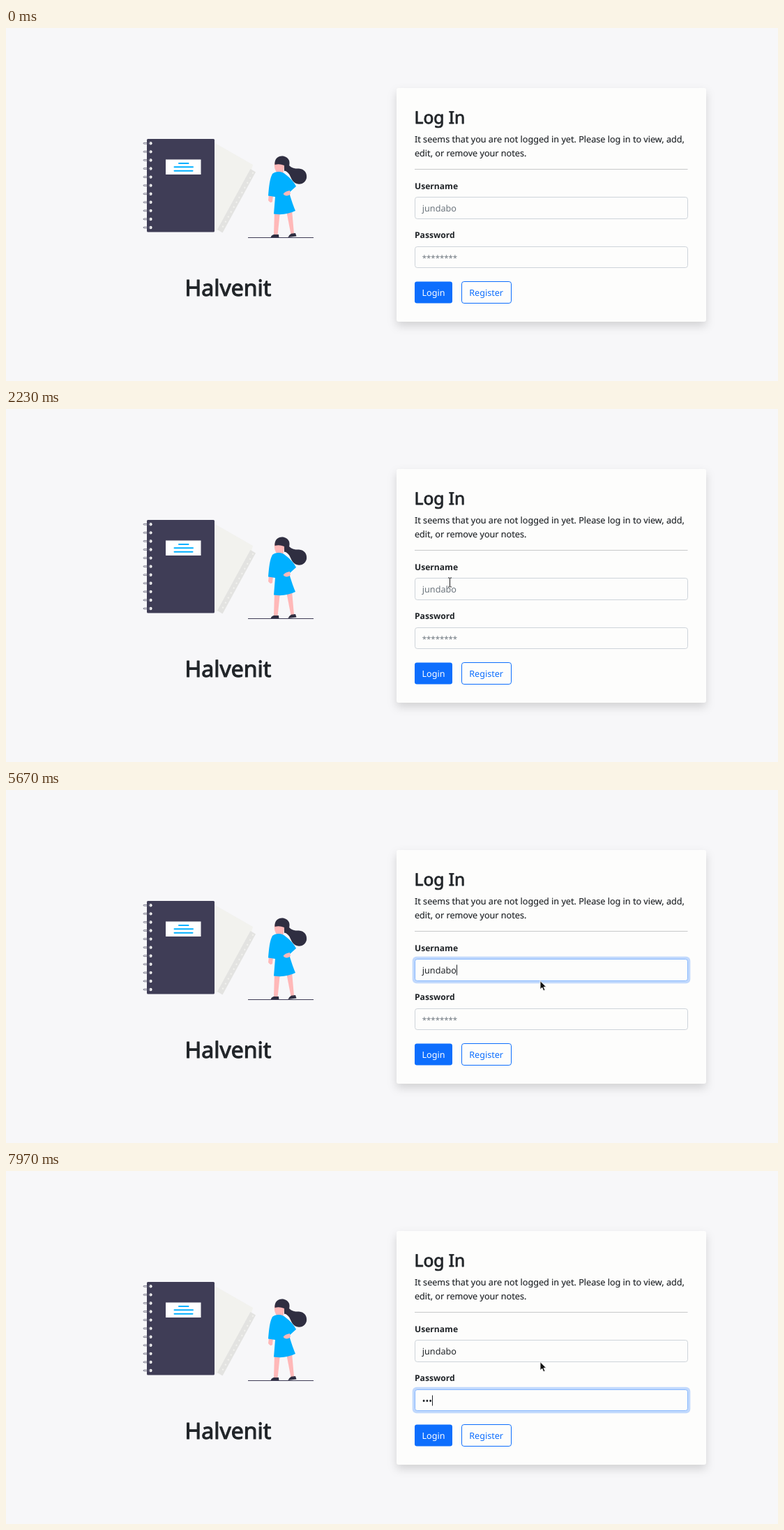
Recreate the animation shown at these times as an HTML page. Size 1107 by 506 pixels, loop 8 s.

```html
<!DOCTYPE html>
<html lang="en">
<head>
<meta charset="utf-8">
<title>Log In</title>
<style>
  html, body { margin: 0; width: 100%; height: 100%; overflow: hidden; background: #f7f7f9; }
  svg { display: block; width: 1107px; height: 506px; }
  text { font: 12.62px "Noto Sans", "Open Sans", sans-serif; fill: #212529; white-space: pre; text-rendering: geometricPrecision; }
  .title, .head { stroke: #212529; stroke-linejoin: round; }
  .title { font-size: 32px; stroke-width: 1.1px; text-anchor: middle; }
  .head { font-size: 24.6px; stroke-width: .85px; }
  .para { stroke: #212529; stroke-width: .15px; }
  .label { font-size: 12.1px; font-weight: 700; }
  .hint { fill: #6c757d; }
  .stars { font-size: 11.4px; }
  .card { fill: #fdfdfc; filter: drop-shadow(0 6.5px 6.5px rgba(0, 0, 0, .15)); }
  .halo { fill: #0d6efd; fill-opacity: .25; }
  .box { fill: #fdfdfc; stroke: #ced4da; }
  .caret { stroke: #212529; }
  .dark { fill: #2f2e41; }
  .skin { fill: #ffb8b8; }
  .blue { fill: #00b0ff; }
</style>
</head>
<body>
<svg viewBox="0 0 1107 506">
  <!-- loose page -->
  <path d="M298 164 L354 196 L352 204 L304 290 L298 290Z" fill="#f2f2ee"/>
  <path d="M350.5 202 L358 206.5 L310.5 293.5 L303 289Z" fill="#e3e3e1"/>
  <path d="M354.5 207 L308 290" stroke="#f2f2ee" stroke-width="2" stroke-dasharray="2 6" fill="none"/>

  <!-- notebook -->
  <rect x="202" y="159" width="97" height="133.5" rx="1.5" fill="#3f3d56"/>
  <g id="rings"></g>
  <rect x="229" y="188.5" width="50.5" height="21.5" fill="#fff"/>
  <path d="M248 194H261.5M241.5 199.2H268M241.5 204.7H267.5" stroke="#00b0ff" stroke-width="2" stroke-linecap="round"/>

  <!-- woman -->
  <path class="skin" d="M385 263 L393 263 L389.5 297 L384 297Z"/>
  <path class="skin" d="M402 262 L410 261 L413 295 L408.5 295.5Z"/>
  <path class="dark" d="M379.5 300.5 Q380 297 384 296 L391 296 L391.5 300.5Z"/>
  <path class="dark" d="M404.5 300 Q406 296.5 409 294.8 L415 294 L416.5 298.5Z"/>
  <path class="dark" d="M402 190 C406 200 412 202 420 201.5 C428 202 432 208 431 215 C429 224 419 226 413 221 C407 216 409 208 399 204Z"/>
  <path class="skin" d="M385 193 L400 193 L397.5 208 L388 207 Q384 201 385 193Z"/>
  <path class="dark" d="M385.5 196 C384 181 402 180 406 190 C408 197 404 204 399 205 L399 197 Q392 194 385.5 196Z"/>
  <path class="skin" d="M377 239 L383 240 L382 249 Q379 252 376 247Z"/>
  <path class="blue" d="M382 209 C387 205 396 205 401 210 C408 215 413 221 416 227 L406 236 C409 246 412 255 415 262 Q401 269 384 266.5 L386 242 L376 240.5 C377 229 378 216 382 209Z"/>
  <path class="skin" d="M407 233 L408 238 Q402 243 397.5 238 Q400 234 407 233Z"/>
  <path d="M347 300.5H441" stroke="#3f3d56"/>
  <text class="title" x="318.5" y="384">Halvenit</text>

  <!-- form -->
  <rect class="card" x="560" y="86" width="444" height="335" rx="3.3"/>
  <text class="head" x="585.5" y="137">Log In</text>
  <text class="para" x="586" y="164">It seems that you are not logged in yet. Please log in to view, add,</text>
  <text class="para" x="586" y="184">edit, or remove your notes.</text>
  <path d="M586 202.5H977.5" stroke="#c8c9ca"/>
  <text class="label" x="586" y="231">Username</text>
  <text class="label" x="586" y="301">Password</text>
  <g id="fields"></g>
  <rect x="586" y="363.5" width="54" height="31" rx="3.3" fill="#0d6efd"/>
  <text x="596.5" y="383.7" style="fill:#fff">Login</text>
  <rect x="653.5" y="363.5" width="71" height="31" rx="3.3" fill="none" stroke="#0d6efd"/>
  <text x="664.2" y="383.7" style="fill:#0d6efd">Register</text>

  <!-- pointers -->
  <path id="arrow" d="M0 0V12.2L2.8 9.6L4.8 14.2L7 13.2L5 8.8H8.8Z" fill="#111" stroke="#fff" stroke-width=".9"/>
  <path id="beam" d="M-2.5 -6.5H-.7L0 -5.8L.7 -6.5H2.5M0 -5.8V5.8M-2.5 6.5H-.7L0 5.8L.7 6.5H2.5" fill="none" stroke="#222"/>
</svg>
<script>
const LOOP = 8000, BLINK = 500, FADE = 150;
const byId = id => document.getElementById(id);

function add(parent, tag, attrs, text = '') {
  const el = document.createElementNS('http://www.w3.org/2000/svg', tag);
  for (const k in attrs) el.setAttribute(k, attrs[k]);
  el.textContent = text;
  return parent.appendChild(el);
}

for (let i = 0; i < 11; i++) {
  const y = 165.3 + i * 12.07;
  add(byId('rings'), 'circle', { cx: 207.4, cy: y, r: 2.2, fill: '#f2f2f2' });
  add(byId('rings'), 'path', {
    d: `M207 ${y - .9}H198Q195.5 ${y} 198 ${y + .9}H207`,
    fill: 'none', stroke: '#55536a', 'stroke-width': .7
  });
}

// keys: times at which each character is typed
const fields = [
  { y: 242.5, h: 31, hint: 'jundabo', value: 'jundabo', focus: 2550, blur: 6030,
    keys: [3700, 4180, 4330, 4490, 4680, 4880, 5200] },
  { y: 313.5, h: 30, hint: '********', value: '•••', focus: 6030, blur: Infinity,
    keys: [7300, 7600, 7830], cls: ' stars' }
];

for (const f of fields) {
  const g = byId('fields'), base = f.y + 20;
  f.halo = add(g, 'rect', { class: 'halo', x: 582.7, y: f.y - 3.8, width: 398.6, height: f.h + 7.6, rx: 6 });
  f.box = add(g, 'rect', { class: 'box', x: 586.5, y: f.y, width: 391, height: f.h, rx: 3.3 });
  f.hintEl = add(g, 'text', { class: 'hint' + (f.cls || ''), x: 596.8, y: base }, f.hint);
  f.text = add(g, 'text', { x: 596.8, y: base });
  f.caret = add(g, 'path', { class: 'caret' });
}

// pointer stops: time, x, y
const stops = [
  [1480, 10, 330], [1800, 330, 296], [2130, 634, 250], [2230, 636.5, 248.5],
  [2450, 650, 256], [2640, 652, 257], [2810, 766, 273.6]
];

const clamp = v => Math.min(1, Math.max(0, v));
const smooth = v => v * v * (3 - 2 * v);
const show = (el, on) => el.setAttribute('visibility', on ? 'visible' : 'hidden');
const mix = (a, b, k) => a.map((v, i) => Math.round(v + (b[i] - v) * k));

function drawField(f, t) {
  const k = smooth(clamp((t - f.focus) / FADE)) - smooth(clamp((t - f.blur) / FADE));
  f.halo.setAttribute('opacity', k);
  f.box.style.stroke = `rgb(${mix([206, 212, 218], [134, 183, 254], k)})`;

  const done = f.keys.filter(key => key <= t);
  f.text.textContent = f.value.slice(0, done.length);
  show(f.hintEl, !done.length);

  const since = t - (done.length ? done[done.length - 1] : f.focus);
  const x = Math.floor(597 + (done.length ? f.text.getComputedTextLength() : 0)) + .5;
  f.caret.setAttribute('d', `M${x} ${f.y + 8}v15`);
  show(f.caret, t >= f.focus && t < f.blur && Math.floor(since / BLINK) % 2 === 0);
}

function drawPointer(t) {
  let i = stops.findIndex(s => s[0] > t);
  if (i < 0) i = stops.length - 1;
  const a = stops[Math.max(0, i - 1)], b = stops[i];
  const k = smooth(clamp((t - a[0]) / (b[0] - a[0] || 1)));
  const x = a[1] + (b[1] - a[1]) * k, y = a[2] + (b[2] - a[2]) * k;
  const inField = x > 586 && y < 273.5, seen = t >= stops[0][0];
  for (const [id, on] of [['arrow', !inField], ['beam', inField]]) {
    byId(id).setAttribute('transform', `translate(${x} ${y})`);
    show(byId(id), seen && on);
  }
}

function draw(t) {
  fields.forEach(f => drawField(f, t));
  drawPointer(t);
}

const start = performance.now();
function tick() {
  draw((performance.now() - start) % LOOP);
  requestAnimationFrame(tick);
}
tick();
</script>
</body>
</html>
```
